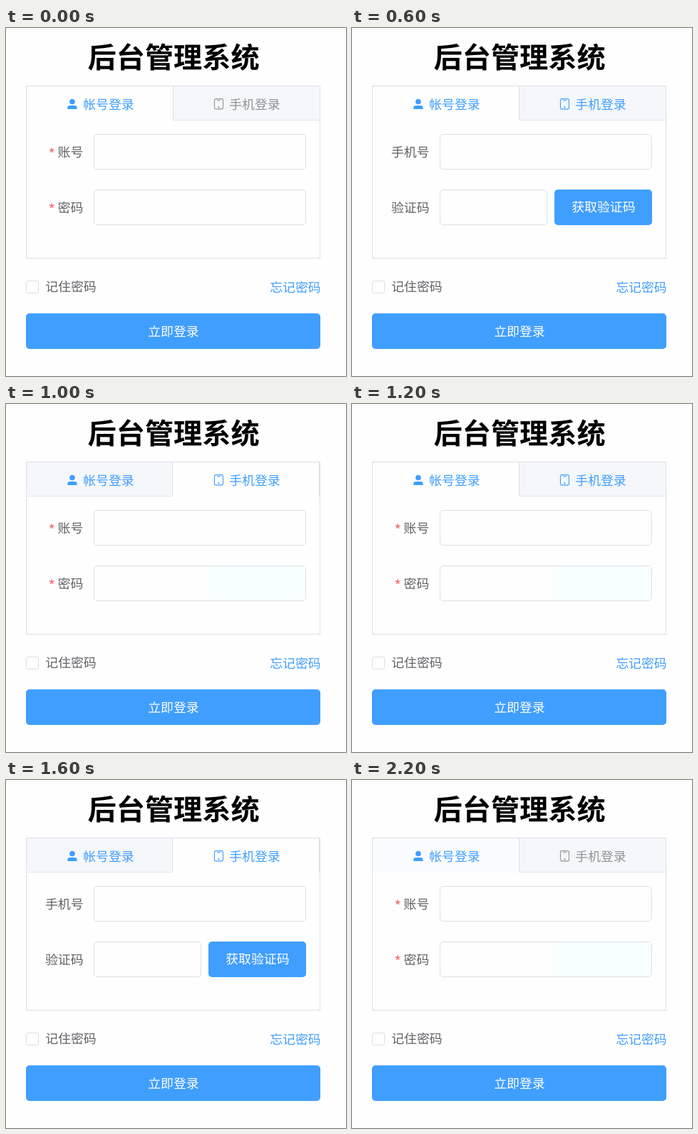
An HTML page that plays this animation: 477 px wide and 489 px high, repeating every 3.1 s.

```html
<!DOCTYPE html>
<html lang="zh-CN">
<head>
<meta charset="utf-8">
<title>后台管理系统</title>
<style>
  html, body { margin: 0; width: 100%; height: 100%; overflow: hidden; background: #fefefe; }
  svg { display: block; width: 477px; height: 489px; }
  text { font: 17.9px "Noto Sans CJK SC", "Noto Sans CJK", sans-serif; fill: #606266; text-rendering: geometricPrecision; }
  .title { font-size: 40.2px; font-weight: 700; fill: #000; }
  .blue { fill: #409eff; }
  .white { fill: #fff; }
  .star { font-size: 21px; fill: #f56c6c; }
  .box { fill: #fefefe; stroke: #dcdfe6; }
  .side { fill: none; stroke: #dcdfe6; }
  .base { fill: none; stroke: #e4e7ed; }
</style>
</head>
<body>
<svg viewBox="0 0 477 489">
  <text class="title" x="114.5" y="55.5">后台管理系统</text>

  <rect class="box" x="28.5" y="81.5" width="412" height="242"/>
  <rect id="accountTab" x="29" y="82" width="205" height="48"/>
  <rect id="phoneTab" x="234" y="82" width="206" height="48"/>
  <g id="accountLines">
    <path class="base" d="M235 129.5H440"/>
    <path class="side" d="M234.5 82V130"/>
  </g>
  <g id="phoneLines">
    <path class="base" d="M29 129.5H233"/>
    <path class="side" d="M233.5 82V130M439.5 82V130"/>
  </g>

  <g class="blue" transform="translate(84.2 98.1) scale(.0171)">
    <circle cx="512" cy="320" r="224"/>
    <path d="M128 928V800A160 160 0 0 1 288 640H736A160 160 0 0 1 896 800V928Z"/>
  </g>
  <text class="blue" x="108.2" y="114">帐号登录</text>
  <g id="phoneIcon" fill="none" stroke="currentColor" stroke-width="64" transform="translate(289.7 98) scale(.0171)">
    <rect x="160" y="96" width="704" height="832" rx="96"/>
    <path d="M384 224H640"/>
    <circle cx="512" cy="768" r="64" fill="currentColor" stroke="none"/>
  </g>
  <text id="phoneText" x="313.2" y="114">手机登录</text>

  <rect class="box" x="123.5" y="149.5" width="297" height="49" rx="4.5"/>
  <g id="accountForm">
    <text class="star" x="59.3" y="185">*</text>
    <text x="72.5" y="181">账号</text>
    <text class="star" x="59.3" y="263">*</text>
    <text x="72.5" y="259">密码</text>
    <rect class="box" x="123.5" y="227.5" width="297" height="49" rx="4.5"/>
    <rect id="tint" x="285" y="228" width="135" height="48" rx="3" fill="#f8ffff"/>
  </g>
  <g id="phoneForm">
    <text x="54.9" y="181">手机号</text>
    <text x="54.9" y="259">验证码</text>
    <rect class="box" x="123.5" y="227.5" width="150" height="49" rx="4.5"/>
    <rect class="blue" x="284" y="227" width="137" height="50" rx="5"/>
    <text class="white" x="308.2" y="258">获取验证码</text>
  </g>

  <rect class="box" x="28.5" y="355.5" width="17" height="17" rx="2"/>
  <text x="55.2" y="370.3">记住密码</text>
  <text class="blue" x="370.2" y="371">忘记密码</text>
  <rect class="blue" x="28" y="401" width="413" height="50" rx="5"/>
  <text class="white" x="199.2" y="433.3">立即登录</text>
</svg>
<script>
const LOOP = 3100, TICK = 100;
const $ = id => document.getElementById(id);

const mix = (from, to, k) => `rgb(${from.map((v, i) => Math.round(v + (to[i] - v) * k))})`;
const shade = k => mix([254, 254, 254], [245, 247, 250], k);

// Rises from 0 to 1 in two hard steps after the given moment.
const ramp = (t, from) => Math.min(1, Math.max(0, Math.floor((t - from) / TICK) / 2));

function draw(t) {
  const phone = (t >= 600 && t < 1000) || (t >= 1400 && t < 2000);
  const active = ramp(t, 600) - ramp(t, 1000) + ramp(t, 1400) - ramp(t, 2000);
  const label = mix([144, 147, 153], [64, 158, 255], ramp(t, 200) - ramp(t, 2000));
  $("accountTab").style.fill = shade(active + ramp(t, 2000) / 2);
  $("phoneTab").style.fill = shade(1 - active);
  $("accountLines").style.opacity = 1 - active;
  $("phoneLines").style.opacity = active;
  $("phoneIcon").style.color = label;
  $("phoneText").style.fill = label;
  $("accountForm").style.display = phone ? "none" : "";
  $("phoneForm").style.display = phone ? "" : "none";
  $("tint").style.display = t < 1000 ? "none" : "";
}

const start = performance.now();
function tick() {
  draw((performance.now() - start) % LOOP);
  requestAnimationFrame(tick);
}
tick();
</script>
</body>
</html>
```
